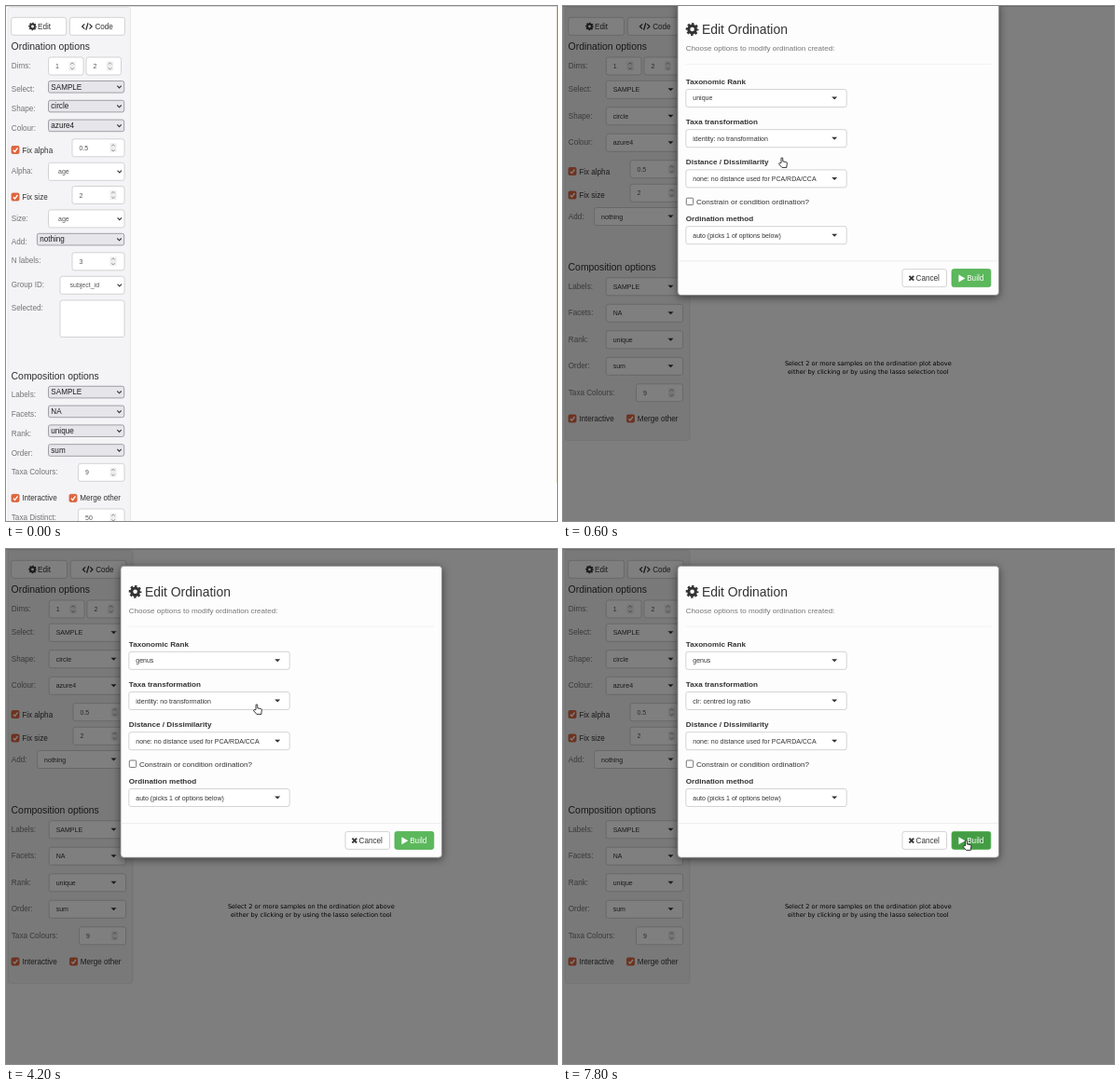
Write an HTML page that moves like this. It is 591 px wide and 553 px high and loops after 8000 ms.

```html
<!DOCTYPE html>
<html lang="en">
<head>
<meta charset="utf-8">
<title>Edit Ordination</title>
<style>
  html, body { margin: 0; width: 100%; height: 100%; overflow: hidden; background: #fefdfe; }
  svg { display: block; width: 591px; height: 553px; }
  text { font-family: "Liberation Sans", Arial, sans-serif; white-space: pre; }
  .plot text { font-family: "DejaVu Sans", sans-serif; }
  #modal { filter: drop-shadow(0 2px 4px rgba(0,0,0,.5)); }
  .menu > .sheet { filter: drop-shadow(0 2px 3px rgba(0,0,0,.2)); }
  .row rect { fill: none; }
  .row text { fill: #6a6a6a; }
  .row.on rect { fill: #f3f3f3; }
  .row.on text { fill: #3a3a3a; }
</style>
</head>
<body>
<svg id="stage" viewBox="0 0 591 553" xmlns="http://www.w3.org/2000/svg"></svg>
<script>
const BODY = 8.15, SMALL = 7;
const STEP = 200, LOOP = 8000;

// Drawing helpers; each returns markup.
const text = (x, y, s, size = BODY, fill = '#333', more = '') =>
  `<text x="${x}" y="${y}" font-size="${size}" fill="${fill}" ${more}>${s}</text>`;
const rect = (x, y, w, h, fill = '#fff', stroke = '#c9c8ca', r = 2.3, more = '') =>
  `<rect x="${x}" y="${y}" width="${w}" height="${h}" rx="${r}" fill="${fill}" stroke="${stroke}" stroke-width=".8" ${more}/>`;
const line = (d, stroke = '#333', w = 1) =>
  `<path d="${d}" fill="none" stroke="${stroke}" stroke-width="${w}"/>`;
const fill = (d, color = '#333') => `<path d="${d}" fill="${color}"/>`;
const group = (id, inner, more = '') => `<g id="${id}" ${more}>${inner}</g>`;

const label = (cy, s, x = 5.8) => text(x, cy + 2.8, s, BODY, '#757476');
const heading = (y, s) => text(5.6, y, s, 10.4, '#2e2d2f');
const caret = (x, y, up) => fill(up
  ? `M${x - 3} ${y + 1.5}h6l-3-3z` : `M${x - 3} ${y - 1.5}h6l-3 3z`);
const chevron = (x, y) => line(`M${x - 2.2} ${y - 1.1}l2.2 2.3 2.2-2.3`, '#333', 1.1);

const gear = (x, y, k) => `<g transform="translate(${x} ${y}) scale(${k})" fill="none" stroke="#333">
  <circle r="2.7" stroke-width="2.2"/>
  <circle r="4" stroke-width="1.7" stroke-dasharray="1.7 1.4416" stroke-dashoffset=".85"/></g>`;

function checkbox(x, cy, s) {
  return rect(x, cy - 4, 8, 8, '#df673f', '#d25a34', 1.3)
    + line(`M${x + 1.8} ${cy + .2}l1.7 1.8 3-4`, '#fff', 1.3)
    + text(x + 11.2, cy + 3, s);
}

function number(x, cy, w, s) {
  const m = x + w - 12;
  return rect(x, cy - 9.5, w, 19)
    + text(x + 7.5, cy + 2.5, s, SMALL, '#555')
    + rect(m - 3.6, cy - 5, 7.2, 10, '#efeeef', 'none', 1)
    + line(`M${m - 1.8} ${cy - 1.8}l1.8-1.8 1.8 1.8M${m - 1.8} ${cy + 1.8}l1.8 1.8 1.8-1.8`, '#888', .9);
}

// Plain browser select, grey
const native = (cy, s, x = 45.5) => rect(x, cy - 6.3, 126.7 - x, 12.6, '#e6e5e9', '#8d8c92', 2)
  + text(x + 2.8, cy + 2.8, s, BODY, '#1e1e1e') + chevron(121.5, cy);
// Plain select with form styling
const formSelect = (cy, s, x = 45.5) => rect(x, cy - 9.5, 81.5 - x + 45.5, 19)
  + text(x + 10.5, cy + 2.5, s, SMALL, '#555') + chevron(121.8, cy);
const select = (x, cy, w, s) => rect(x, cy - 9.5, w, 19)
  + text(x + 7.5, cy + 2.5, s, SMALL) + caret(x + w - 13, cy);

function topButtons(x2, w) {
  const cx = x2 + 18.5;
  return rect(5.7, 12.3, w, 19) + gear(28.5, 22, .9) + text(34, 25, 'Edit')
    + rect(x2, 12.3, w, 19)
    + line(`M${cx - 2.6} 19.4l-2.6 2.6 2.6 2.6M${cx + 2.6} 19.4l2.6 2.6-2.6 2.6M${cx + 1.1} 18.2l-2.2 7.6`, '#333', 1.3)
    + text(x2 + 27, 25, 'Code');
}

const rawPanel = () => rect(2, 1.5, 131.5, 560, '#f4f3f5', '#e4e3e5')
  + topButtons(68.4, 59) + heading(47, 'Ordination options')
  + label(64, 'Dims:') + number(45.6, 64.5, 37.5, '1') + number(86, 64.5, 37.5, '2')
  + label(89, 'Select:') + native(86.8, 'SAMPLE')
  + label(110, 'Shape:') + native(107.6, 'circle')
  + label(131, 'Colour:') + native(128.4, 'azure4')
  + checkbox(6, 154.5, 'Fix alpha') + number(71, 152.3, 56, '0.5')
  + label(177, 'Alpha:') + formSelect(177.8, 'age')
  + checkbox(6, 205, 'Fix size') + number(71, 203, 56, '2')
  + label(228, 'Size:') + formSelect(228.4, 'age')
  + label(253, 'Add:') + native(250.6, 'nothing', 33.4)
  + label(273.3, 'N labels:') + number(71, 274.3, 56, '3')
  + label(299.3, 'Group ID:') + formSelect(299.8, 'subject_id', 58)
  + label(324, 'Selected:') + rect(58, 316, 69, 39.5)
  + heading(400.5, 'Composition options')
  + label(417, 'Labels:') + native(414.6, 'SAMPLE')
  + label(438, 'Facets:') + native(435.4, 'NA')
  + label(459, 'Rank:') + native(456.2, 'unique')
  + label(480, 'Order:') + native(477, 'sum')
  + label(500, 'Taxa Colours:') + number(77.6, 500.8, 49.4, '9')
  + checkbox(6, 528.4, 'Interactive') + checkbox(68, 528.4, 'Merge other')
  + label(548.8, 'Taxa Distinct:') + number(77.6, 549.5, 49.4, '50');

const styledRows = rows => rows.map(([cy, name, value]) =>
  label(cy - .4, name) + select(46.2, cy, 82.3, value)).join('');

const panel = () => rect(2.4, 1.5, 133.4, 465, '#f4f3f5', '#e6e5e7')
  + topButtons(69.2, 59.8) + heading(47, 'Ordination options')
  + label(64, 'Dims:') + number(46.3, 64.5, 37.8, '1') + number(87, 64.5, 37.5, '2')
  + styledRows([[89.8, 'Select:', 'SAMPLE'], [118.2, 'Shape:', 'circle'], [146.8, 'Colour:', 'azure4']])
  + checkbox(6, 177.5, 'Fix alpha') + number(72, 175.2, 56.5, '0.5')
  + checkbox(6, 203, 'Fix size') + number(72, 200.8, 56.5, '2')
  + label(225.7, 'Add:') + select(33.6, 226, 94.9, 'nothing')
  + heading(284, 'Composition options')
  + styledRows([[301.3, 'Labels:', 'SAMPLE'], [329.8, 'Facets:', 'NA'], [358.3, 'Rank:', 'unique'], [386.8, 'Order:', 'sum']])
  + label(414.8, 'Taxa Colours:') + number(78.5, 415.3, 50, '9')
  + checkbox(6, 443, 'Interactive') + checkbox(68.5, 443, 'Merge other');

const plotNote = () => ['Select 2 or more samples on the ordination plot above', 'either by clicking or by using the lasso selection tool']
  .map((s, i) => text(327.3, 385.8 + 9.3 * i, s, 6.55, '#000', 'text-anchor="middle"')).join('');

const field = (cy, name, value, id) =>
  text(131.8, cy - 15.3, name, 8.1, '#333', 'font-weight="bold"')
  + select(131.8, cy, 172.4, id ? `<tspan id="${id}">${value}</tspan>` : value);

const modal = () => rect(123, 18.3, 344.5, 313, '#fefdfe', '#8a8a8a', 3.5)
  + gear(138.6, 45.8, 1.42) + text(149, 51, 'Edit Ordination', 13.9)
  + text(131.8, 68.9, 'Choose options to modify ordination created:', 8.05, '#777')
  + line('M132 83.3H459', '#f0eff0', .8) + line('M123.5 294.6H467', '#eae9ea', .8)
  + field(119.8, 'Taxonomic Rank', 'unique', 'rank')
  + field(163, 'Taxa transformation', 'identity: no transformation', 'trans')
  + field(206.2, 'Distance / Dissimilarity', 'none: no distance used for PCA/RDA/CCA')
  + rect(132.3, 227, 7.4, 7.4, '#fff', '#555', 1)
  + text(143, 233.6, 'Constrain or condition ordination?', 8.1)
  + field(267, 'Ordination method', 'auto (picks 1 of options below)')
  + rect(364, 303.4, 47.5, 19) + line('M371.4 310.7l4.8 4.8m0-4.8l-4.8 4.8', '#333', 1.8)
  + text(378.6, 316, 'Cancel')
  + rect(417, 303.4, 41.8, 19, '#5cb85c', '#4cae4c', 2.3, 'id="build"')
  + fill('M424.4 309.2l7 4-7 4z', '#fff') + text(433.2, 316, 'Build', BODY, '#fff');

const ROW = 13.25;
function menu(id, cy, value, caretX, items) {
  const top = cy + 11, x = 131.8, w = 172.4;
  const rows = items.map((s, i) => {
    const y = top + 3.9 + i * ROW;
    return `<g class="row"><rect x="${x + .5}" y="${y}" width="${w - 1}" height="${ROW}"/>`
      + text(x + 7.5, y + 9.1, s, SMALL, '') + '</g>';
  }).join('');
  return group(id,
    rect(x - .8, cy - 10.3, w + 1.6, 20.6, 'none', '#b9dbf4', 3)
    + rect(x, cy - 9.5, w, 19, '#fff', '#66afe9')
    + text(x + 7.5, cy + 2.5, value, SMALL) + line(`M${caretX} ${cy - 4}v8`, '#333', .7)
    + caret(291.2, cy, true)
    + rect(x, top, w, items.length * ROW + 7.5, '#fff', '#cfcfcf', 1.5, 'class="sheet"') + rows,
    'class="menu"');
}

const arrow = () => `<path id="arrow" d="M0 0V10.2L2.3 8.1 3.9 11.6 5.5 10.9 4 7.5H7.1Z" fill="#fff" stroke="#222" stroke-width=".9"/>`;
const hand = () => `<path id="hand" d="M3 6.2V1.4Q3 .3 3.9 .3T4.8 1.4V4.4L8.2 5Q9.6 5.3 9.4 6.7L8.9 9.4V10.9H3.9L.7 7.3Q.3 6.2 1.4 6.1Z" fill="#fff" stroke="#222" stroke-width=".9"/>`;

const stage = document.getElementById('stage');
stage.innerHTML = '<rect width="591" height="553" fill="#fefdfe"/>'
  + group('raw', rawPanel() + line('M590.5 0V512', '#efe6d0'))
  + group('styled', panel())
  + group('note', plotNote(), 'class="plot"')
  + line('M0 .4H591', '#d2d0d3')
  + '<rect id="shade" width="591" height="553" fill="#000"/>'
  + group('modal', modal())
  + menu('rankMenu', 119.8, 'unique', 160.5, ['unique', 'kingdom', 'phylum', 'class', 'order', 'family', 'genus'])
  + menu('transMenu', 163, 'identity: no transformation', 219.7, ['identity: no transformation', 'clr: centred log ratio',
      'log10p: log10(x + 1)', 'compositional', 'hellinger', 'binary: presence-absence'])
  + arrow() + hand();

const $ = id => document.getElementById(id);
const show = (id, on) => { $(id).style.display = on ? '' : 'none'; };

// Pointer path: time, x, y
const path = [
  [200, 232, 165], [400, 232, 165], [600, 231, 162.5], [1400, 231, 162.5],
  [2200, 268, 122.5], [2600, 268, 122.5], [3200, 236, 215], [3600, 236, 215],
  [4200, 265, 166.5], [5200, 265, 166.5], [5800, 228, 191.5], [6400, 228, 191.5],
  [7400, 397, 246], [7600, 422, 288], [7800, 428.5, 312.5]
];

function pointer(t) {
  const i = path.findIndex(p => p[0] > t);
  if (i < 0) return path[path.length - 1].slice(1);
  if (i === 0) return path[0].slice(1);
  const [t0, x0, y0] = path[i - 1], [t1, x1, y1] = path[i];
  const k = (t - t0) / (t1 - t0);
  return [x0 + (x1 - x0) * k, y0 + (y1 - y0) * k];
}

function openMenu(id, on, y, cy) {
  show(id, on);
  const rows = $(id).querySelectorAll('.row');
  const active = Math.max(0, Math.min(rows.length - 1, Math.floor((y + 4 - cy - 14.9) / ROW)));
  rows.forEach((row, i) => row.classList.toggle('on', i === active));
}

function draw(t) {
  const [x, y] = pointer(t);
  show('raw', t < 200);
  show('styled', t >= 200);
  show('note', t >= 600);
  $('shade').setAttribute('opacity', t < 400 ? 0 : t < 600 ? .35 : .5);
  show('modal', t >= 600);
  $('modal').setAttribute('transform', `translate(0 ${t < 800 ? -20.8 : 0})`);
  $('rank').textContent = t < 3600 ? 'unique' : 'genus';
  $('trans').textContent = t < 6400 ? 'identity: no transformation' : 'clr: centred log ratio';
  openMenu('rankMenu', t >= 2600 && t < 3600, y, 119.8);
  openMenu('transMenu', t >= 5200 && t < 6400, y, 163);
  $('build').setAttribute('fill', t < 7800 ? '#5cb85c' : '#449d44');

  const isArrow = t < 600 || (t >= 6600 && t < 7800);
  show('arrow', t >= 200 && isArrow);
  show('hand', !isArrow);
  $(isArrow ? 'arrow' : 'hand').setAttribute('transform', `translate(${x} ${y})`);
}

const start = performance.now();
let last = -1;
function tick() {
  const t = Math.floor((performance.now() - start) % LOOP / STEP) * STEP;
  if (t !== last) draw(last = t);
  requestAnimationFrame(tick);
}
tick();
</script>
</body>
</html>
```
